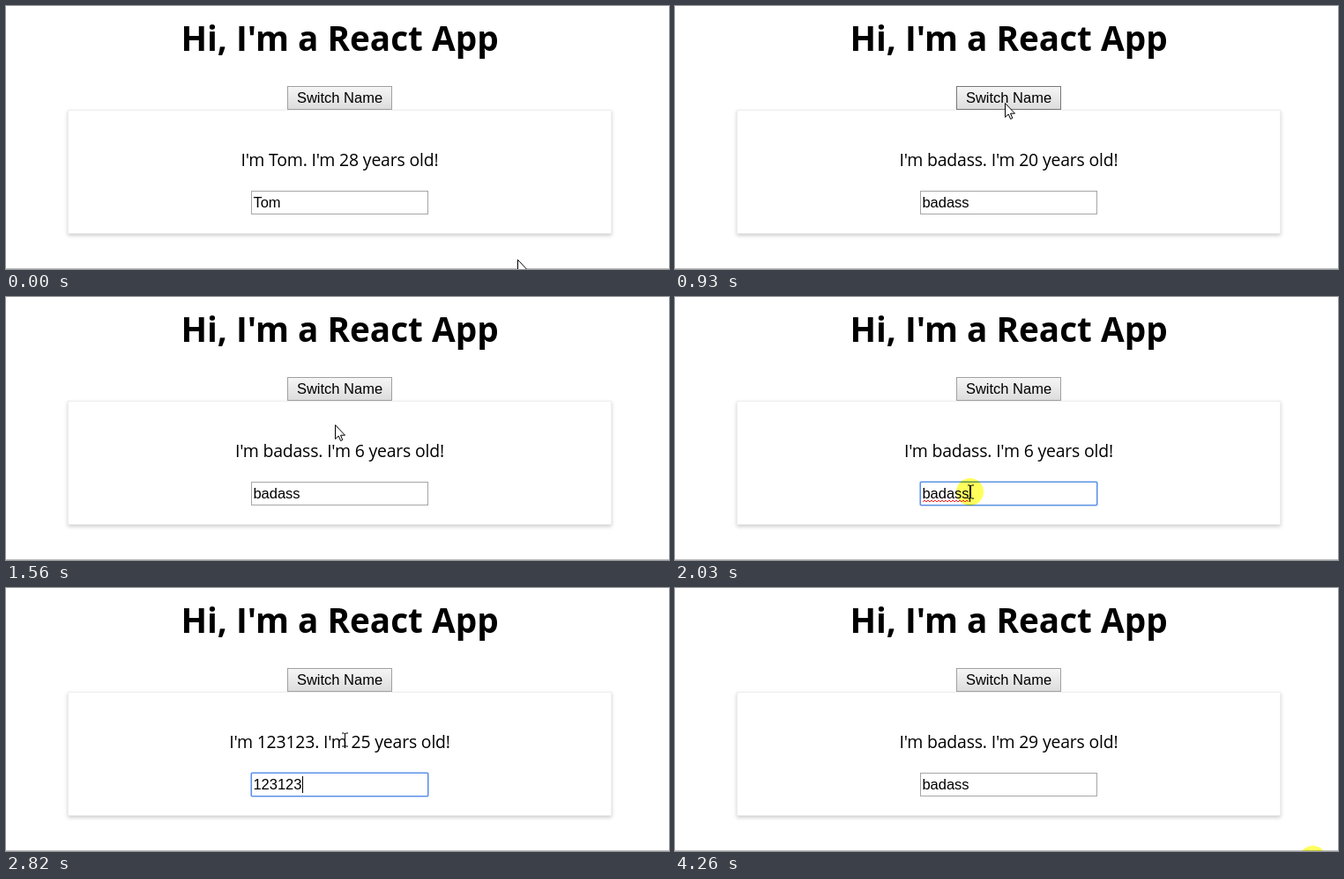
Animation of 752 by 299 pixels, one loop 4.33 s. Source, as an HTML page:

```html
<!DOCTYPE html>
<html lang="en">
<head>
<meta charset="utf-8">
<title>React App</title>
<style>
  html, body { margin: 0; height: 100%; overflow: hidden; background: #fff; }
  svg { display: block; }
  text { white-space: pre; }
  .page { font-family: "Open Sans", "Noto Sans", sans-serif; text-anchor: middle; }
  .title { font-size: 38.7px; font-weight: 700; }
  .line { font-size: 19.4px; letter-spacing: -.17px; }
  .control { font: 16.5px "Liberation Sans", Arial, sans-serif; }
  .card { fill: #fff; stroke: #eee; filter: drop-shadow(0 2.5px 1.9px #ccc); }
  #spot { fill: #ffff5c; mix-blend-mode: multiply; }
</style>
</head>
<body>
<svg width="752" height="299" viewBox="0 0 752 299">
  <defs>
    <linearGradient id="raised" x2="0" y2="1">
      <stop stop-color="#f6f6f6"/><stop offset="1" stop-color="#dcdcdc"/>
    </linearGradient>
    <linearGradient id="pressed" x2="0" y2="1">
      <stop stop-color="#dcdcdc"/><stop offset="1" stop-color="#f6f6f6"/>
    </linearGradient>
  </defs>
  <rect width="752" height="299" fill="#fff"/>
  <text class="page title" x="378.5" y="51">Hi, I'm a React App</text>
  <rect class="card" x="70.5" y="118.5" width="616" height="140"/>
  <rect id="button" x="319.5" y="91.5" width="118" height="26"/>
  <text class="control" x="378.5" y="110" text-anchor="middle">Switch Name</text>
  <text id="line" class="page line" x="378.5" y="182"></text>
  <rect x="278.5" y="210.5" width="200" height="26" fill="#fff" stroke="#a6a6a6"/>
  <rect id="focus" x="278.25" y="210.25" width="200.5" height="26.5" rx="1" fill="none" stroke="#5d92e6" stroke-width="1.6"/>
  <rect id="selection" x="280" y="214" width="54" height="19" fill="#3390ff"/>
  <text id="field" class="control" x="280.4" y="229"></text>
  <path id="squiggle" fill="none" stroke="#f22"/>
  <path id="caret" d="M.5 214v19" stroke="#000"/>
  <path d="M0 298.5H752" stroke="#c0c0c0"/>
  <path id="arrow" d="M.5.5V16.5L4.2 13 6.6 18.5 8.8 17.5 6.5 12.2H11.5Z" fill="#fff" stroke="#000"/>
  <path id="beam" d="M-3.5-7.5h2.5l1 1 1-1h2.5M-3.5 7.5h2.5l1-1 1 1h2.5M0-7V7" fill="none" stroke="#000"/>
  <circle id="spot" r="15.5"/>
</svg>
<script>
const LOOP = 4330;
const el = {};
for (const node of document.querySelectorAll('[id]')) el[node.id] = node;

// start, end, steps, target x, target y, optional bend point
const moves = [
  [70, 560, 7, 374, 110],
  [1490, 1650, 3, 371, 246],
  [1800, 1960, 3, 334, 221],
  [2130, 2210, 2, 204, 209],
  [2350, 2820, 7, 383, 172, 400, 285],
  [2900, 3070, 3, 372, 98],
  [3640, 3870, 4, 601, 226],
  [3950, 4100, 3, 723, 308]
];

// time, name, age
const renders = [
  [0, 'Tom', 28], [770, 'badass', 20], [1240, 'badass', 6],
  [2350, '1', 11], [2430, '12', 24], [2510, '123', 18],
  [2590, '1231', 17], [2670, '12312', 30], [2740, '123123', 25],
  [3240, 'badass', 15], [3640, 'badass', 29]
];

const highlights = [[640, 930], [1170, 1320], [2030, 2280], [3070, 3390], [3560, 3640], [4260, LOOP]];
const presses = [[710, 930], [1090, 1240], [3070, 3390], [3480, 3640]];

const during = (t, spans) => spans.some(([a, b]) => t >= a && t < b);
const inside = ([x, y], l, t, r, b) => x >= l && x < r && y >= t && y < b;
const show = (node, on) => node.setAttribute('visibility', on ? 'visible' : 'hidden');
const place = (node, x, y) => node.setAttribute('transform', `translate(${x} ${y})`);

function pointer(t) {
  let x = 580, y = 288;
  for (const [start, end, steps, tx, ty, bx = (x + tx) / 2, by = (y + ty) / 2] of moves) {
    if (t < start) break;
    const step = Math.min(steps, Math.floor((t - start) / (end - start) * (steps - 1) + 1e-6) + 1);
    const k = step / steps, u = k * k * (3 - 2 * k), v = 1 - u;
    x = v * v * x + 2 * u * v * bx + u * u * tx;
    y = v * v * y + 2 * u * v * by + u * u * ty;
  }
  return [Math.round(x), Math.round(y)];
}

function draw(t) {
  const [, name, age] = renders.findLast(r => t >= r[0]);
  el.line.textContent = `I'm ${name}. I'm ${age} years old!`;
  el.field.textContent = name;

  const at = pointer(t), [x, y] = at;
  const pressed = during(t, presses);
  const hover = inside(at, 319, 91, 438, 118);
  el.button.setAttribute('fill', `url(#${pressed ? 'pressed' : 'raised'})`);
  el.button.setAttribute('stroke', pressed ? '#999' : hover ? '#777' : '#a0a0a0');

  const focused = during(t, [[2030, 3070]]);
  const selected = during(t, [[2130, 2350]]);
  show(el.focus, focused);
  show(el.selection, selected);
  show(el.squiggle, during(t, [[2030, 2350]]));
  show(el.caret, focused && !selected);
  place(el.caret, Math.round(281 + el.field.getComputedTextLength()), 0);
  el.field.setAttribute('fill', selected ? '#fff' : '#000');

  const beam = during(t, [[2030, 2280]]) ||
    inside(at, 278, 210, 479, 237) || inside(at, 253, 163, 503, 187);
  show(el.beam, beam);
  show(el.arrow, !beam);
  place(el.beam, x + 1.5, y + .5);
  place(el.arrow, x, y);
  show(el.spot, during(t, highlights));
  place(el.spot, x + .5, y + .5);
}

el.squiggle.setAttribute('d', 'M281 233' + 'l2-2 2 2'.repeat(13));

function tick() {
  draw(performance.now() % LOOP);
  requestAnimationFrame(tick);
}
tick();
</script>
</body>
</html>
```
